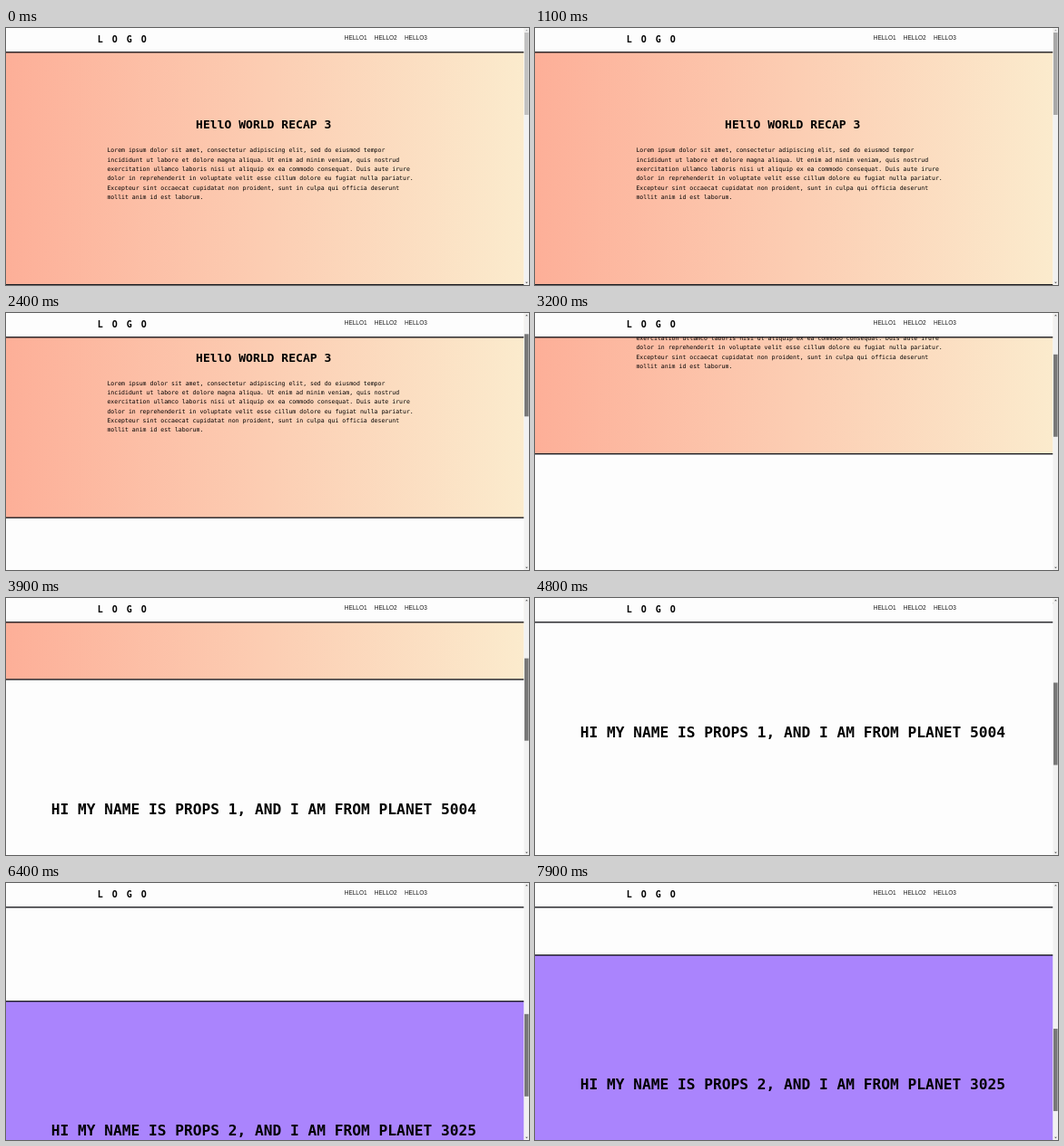
These frames come from a looping animation (576x284 px, 8000 ms). An HTML page:

```html
<!DOCTYPE html>
<html lang="en">
<head>
<meta charset="utf-8">
<title>Scrolling page</title>
<style>
html, body { margin: 0; width: 100%; height: 100%; overflow: hidden; background: #fdfdfd; }
svg { display: block; width: 576px; height: 284px; }
text { white-space: pre; fill: #000; font-family: "DejaVu Sans Mono", monospace; }
.logo { font-size: 10px; font-weight: bold; letter-spacing: 10px; }
.nav text { font-family: "Liberation Sans", Arial, sans-serif; font-size: 6.5px; fill: #1c1c1c; }
.title { font-size: 13.05px; font-weight: bold; text-anchor: middle; }
.intro { font-size: 6.52px; }
.hello { font-size: 16.22px; font-weight: bold; text-anchor: middle; }
.line { fill: #1d1d22; }
</style>
</head>
<body>
<svg viewBox="0 0 576 284">
  <defs>
    <linearGradient id="peach">
      <stop stop-color="#fdaf98"/>
      <stop offset="1" stop-color="#fbebcd"/>
    </linearGradient>
  </defs>
  <rect width="576" height="284" fill="#fdfdfd"/>
  <g id="page">
    <rect width="570.5" height="283.5" fill="url(#peach)"/>
    <rect y="570" width="570.5" height="285" fill="#aa84fd"/>
    <rect class="line" y="283" width="570.5" height="1.4"/>
    <rect class="line" y="569" width="570.5" height="1.4"/>
    <rect class="line" y="854" width="570.5" height="1.4"/>
    <text class="title" x="283.7" y="111">HEllO WORLD RECAP 3</text>
    <g class="intro" id="intro"></g>
    <text class="hello" x="283.8" y="432.4">HI MY NAME IS PROPS 1, AND I AM FROM PLANET 5004</text>
    <text class="hello" x="283.8" y="718.4">HI MY NAME IS PROPS 2, AND I AM FROM PLANET 3025</text>
  </g>
  <rect width="570.5" height="26.2" fill="#fdfdfd"/>
  <rect class="line" y="26.1" width="570.5" height="1.4"/>
  <text class="logo" x="100.8" y="16.2">LOGO</text>
  <g class="nav">
    <text x="372.7" y="13">HELLO1</text>
    <text x="405.8" y="13">HELLO2</text>
    <text x="438.9" y="13">HELLO3</text>
  </g>
  <rect x="570.5" width="5.5" height="284" fill="#f1f1f1"/>
  <path id="up" d="M572 3.3h2.8l-1.4-1.6z"/>
  <path id="down" d="M572 280.7h2.8l-1.4 1.6z"/>
  <rect id="thumb" x="571" width="4.6" height="91"/>
</svg>
<script>
const $ = id => document.getElementById(id);
const LOOP = 8000, STEP = 100, MAX_SCROLL = 572;

const intro = [
  "Lorem ipsum dolor sit amet, consectetur adipiscing elit, sed do eiusmod tempor",
  "incididunt ut labore et dolore magna aliqua. Ut enim ad minim veniam, quis nostrud",
  "exercitation ullamco laboris nisi ut aliquip ex ea commodo consequat. Duis aute irure",
  "dolor in reprehenderit in voluptate velit esse cillum dolore eu fugiat nulla pariatur.",
  "Excepteur sint occaecat cupidatat non proident, sunt in culpa qui officia deserunt",
  "mollit anim id est laborum."
];
$("intro").innerHTML = intro
  .map((line, i) => `<text x="111.4" y="${137.2 + i * 10.35}">${line}</text>`).join("");

// Time in ms, scroll offset in px
const path = [
  [0, 0], [1400, 0], [1800, 16], [2400, 57.5], [3200, 128], [3600, 161], [4500, 259],
  [4800, 278], [5400, 336], [6400, 439], [7100, MAX_SCROLL], [7250, MAX_SCROLL], [7900, 490]
];

function scrollAt(t) {
  const i = path.findIndex(p => p[0] > t);
  if (i < 0) return path[path.length - 1][1];
  const [t0, s0] = path[i - 1], [t1, s1] = path[i];
  return s0 + (s1 - s0) * (t - t0) / (t1 - t0);
}

function draw(now) {
  const t = Math.floor(now % LOOP / STEP) * STEP;
  const scroll = scrollAt(t);
  $("page").setAttribute("transform", `translate(0 ${-scroll})`);
  $("thumb").setAttribute("y", 5 + scroll / 3.14);
  $("thumb").setAttribute("fill", t < 500 ? "#c1c1c1" : t < 1400 ? "#a8a8a8" : "#787878");
  $("up").setAttribute("fill", scroll > 0 ? "#505050" : "#a3a3a3");
  $("down").setAttribute("fill", scroll < MAX_SCROLL ? "#505050" : "#a3a3a3");
}

const start = performance.now();
function tick() {
  draw(performance.now() - start);
  requestAnimationFrame(tick);
}
tick();
</script>
</body>
</html>
```
